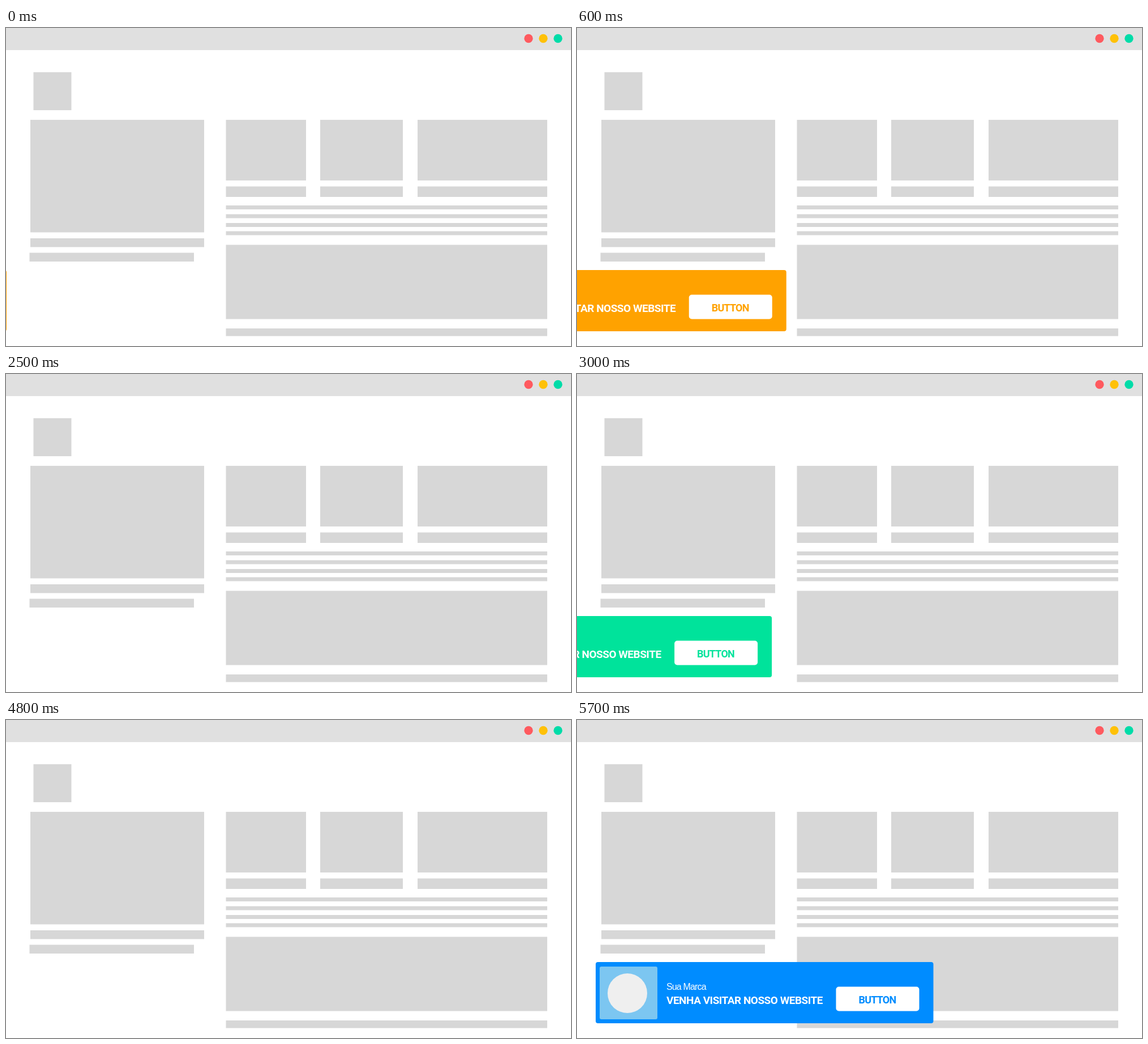
An HTML page that plays this animation: 998x561 px, repeating every 7.2 s.

```html
<!DOCTYPE html>
<html lang="pt">
<head>
<meta charset="utf-8">
<title>Banner</title>
<style>
  html, body { margin: 0; width: 100%; height: 100%; overflow: hidden; background: #fff; }
  svg { display: block; width: 998px; height: 561px; }
  .block { fill: #d7d7d7; }
  .brand { font: 16px "Liberation Sans", Arial, sans-serif; letter-spacing: -.85px; }
  .title { font: 700 19px Roboto, sans-serif; letter-spacing: -.5px; }
  .label { font: 700 18px Roboto, sans-serif; letter-spacing: -.8px; }
</style>
</head>
<body>
<svg viewBox="0 0 998 561">
  <rect width="998" height="39" fill="#e0e0e0"/>
  <circle cx="923" cy="18.5" r="7.7" fill="#ff5a5f"/>
  <circle cx="949" cy="18.5" r="7.7" fill="#ffc107"/>
  <circle cx="975" cy="18.5" r="7.7" fill="#00dca8"/>
  <g class="block">
    <rect x="48.5" y="78" width="67" height="67"/>
    <rect x="43" y="162" width="307" height="198.5"/>
    <rect x="43" y="371" width="307" height="15.5"/>
    <rect x="41.5" y="396.5" width="290.5" height="15.5"/>
    <rect x="388.5" y="162" width="141.5" height="107"/>
    <rect x="555" y="162" width="146" height="107"/>
    <rect x="727" y="162" width="229" height="107"/>
    <rect x="388.5" y="279.5" width="141.5" height="18.5"/>
    <rect x="555" y="279.5" width="146" height="18.5"/>
    <rect x="727" y="279.5" width="229" height="18.5"/>
    <rect x="388.5" y="313" width="567.5" height="7"/>
    <rect x="388.5" y="328.5" width="567.5" height="7"/>
    <rect x="388.5" y="344" width="567.5" height="7"/>
    <rect x="388.5" y="358.5" width="567.5" height="7"/>
    <rect x="388.5" y="382.5" width="567.5" height="131"/>
    <rect x="388.5" y="530" width="567.5" height="13.5"/>
  </g>
  <g id="banner">
    <rect id="bar" x="33" y="427" width="596.5" height="108" rx="4"/>
    <rect id="tile" x="40" y="435" width="102" height="93" rx="3"/>
    <circle cx="89" cy="482" r="35" fill="#efefef"/>
    <text class="brand" x="158" y="476" fill="#fff">Sua Marca</text>
    <text class="title" x="158" y="500.5" fill="#fff">VENHA VISITAR NOSSO WEBSITE</text>
    <rect x="457.5" y="470.5" width="147" height="43" rx="5" fill="#fff"/>
    <text class="label" id="label" x="497.5" y="499.5">BUTTON</text>
  </g>
</svg>
<script>
  const LOOP = 7200, STEP = 100, BAR_RIGHT = 629.5;
  // edge: where the bar's right side starts; rest: final horizontal offset
  const scenes = [
    { start: 0, steps: 9, edge: 1, rest: 0, color: '#ffa200', tile: '#ffc780' },
    { start: 2500, steps: 8, edge: 0, rest: .5, color: '#00e39b', tile: '#92ecd5' },
    { start: 4800, steps: 9, edge: 0, rest: 0, color: '#008cff', tile: '#7cc6f1' }
  ];
  const [banner, bar, tile, label] =
    ['banner', 'bar', 'tile', 'label'].map(id => document.getElementById(id));

  function offset(scene, time) {
    const step = Math.floor((time - scene.start) / STEP);
    if (step >= scene.steps) return scene.rest;
    const k = step * 9 / scene.steps;
    return scene.edge + 56.9 * k + .76 * k * k - BAR_RIGHT;
  }

  function draw(now) {
    const time = now % LOOP;
    const scene = scenes.filter(s => s.start <= time).pop();
    banner.setAttribute('transform', `translate(${offset(scene, time)} 0)`);
    bar.setAttribute('fill', scene.color);
    label.setAttribute('fill', scene.color);
    tile.setAttribute('fill', scene.tile);
  }

  const begin = performance.now();
  function tick() {
    draw(performance.now() - begin);
    requestAnimationFrame(tick);
  }
  tick();
</script>
</body>
</html>
```
